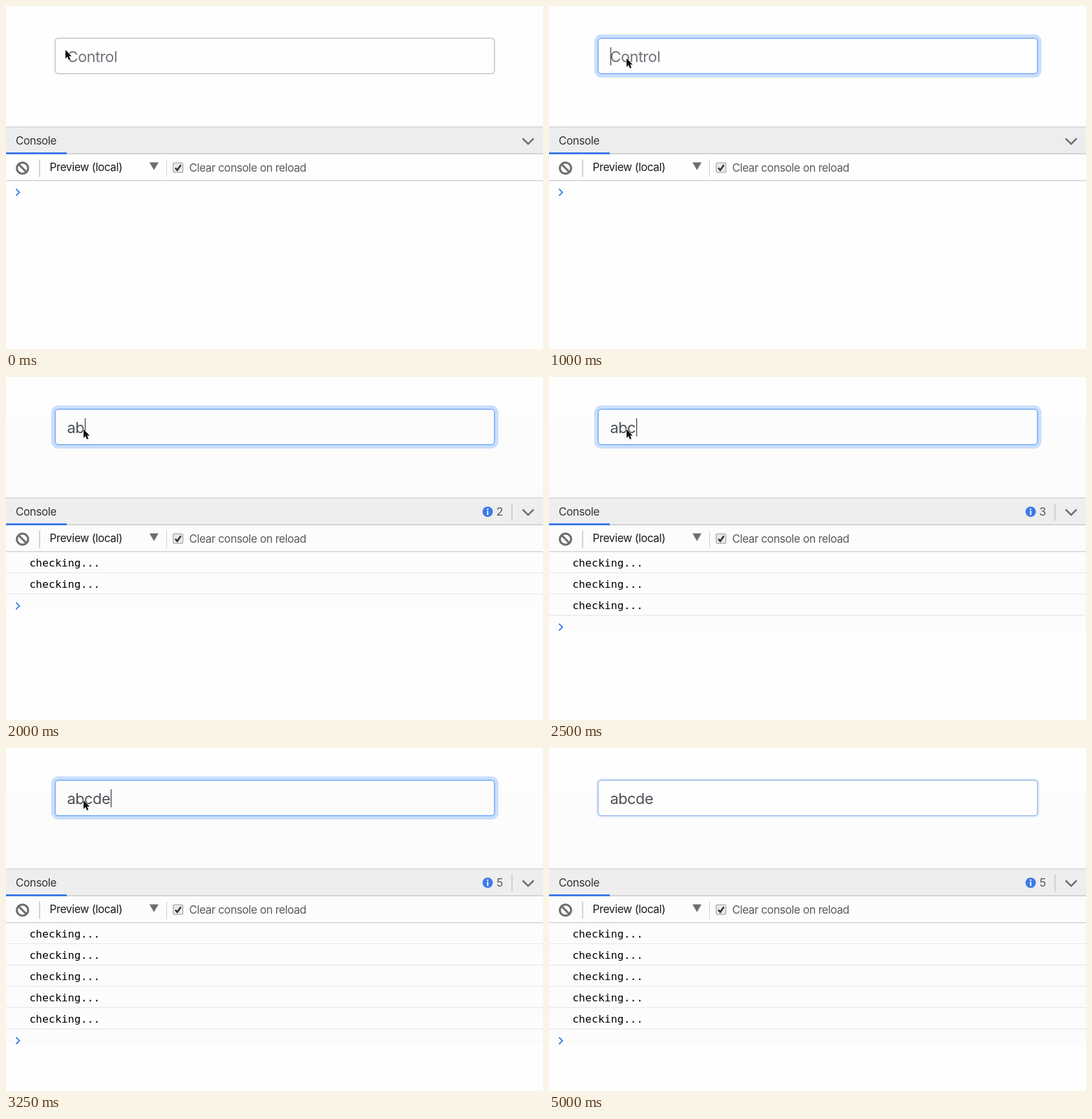
These frames come from a looping animation (831 px wide and 532 px high, 5250 ms). An HTML page:

```html
<!DOCTYPE html>
<html lang="en">
<head>
<meta charset="utf-8">
<title>Console check</title>
<style>
  html, body { margin: 0; width: 100%; height: 100%; overflow: hidden; background: #fefefe; }
  svg { display: block; width: 831px; height: 532px; }
  text { font: 17px Inter, "Open Sans", sans-serif; letter-spacing: -.42px; white-space: pre; }
  #value { font-size: 23.5px; letter-spacing: -.5px; }
  .log text { font: 16.5px "DejaVu Sans Mono", monospace; letter-spacing: 0; }
  .line { fill: none; stroke-linecap: butt; }
</style>
</head>
<body>
<svg viewBox="0 0 831 532">
  <rect id="tint" y="64" width="831" fill="#fcfcfc"/>

  <rect id="ring" fill="none"/>
  <rect id="field" x="76" y="50" width="680" height="55" rx="5" stroke-width="2"/>
  <text id="value" x="94.5" y="87"/>
  <path id="spell" class="line" d="M95 90.5H160" stroke="#e58a8a" stroke-width="2" stroke-dasharray="4 2"/>
  <rect id="caret" y="64" width="1.2" height="28" fill="#333"/>

  <rect id="bar" y="187" width="831" height="42"/>
  <path class="line" d="M0 187.5H831" stroke="#c6c6c6"/>
  <path class="line" d="M0 229.2H831" stroke="#c9c9c9" stroke-width="1.6"/>
  <path class="line" d="M0 228.5H94" stroke="#3b78e7" stroke-width="3"/>
  <text x="15" y="215" fill="#333">Console</text>
  <path class="line" d="M799.5 205.5L808 214L816.5 205.5" stroke="#6e6e6e" stroke-width="2.6"/>
  <g id="badge">
    <path class="line" d="M783 196V223" stroke="#c4c4c4" stroke-width="1.4"/>
    <g id="info">
      <circle r="8" fill="#3f79e8"/>
      <path class="line" d="M0 -5V-2.8M0 -1.5V5" stroke="#fff" stroke-width="2"/>
    </g>
    <text id="count" x="769" y="215" text-anchor="end" fill="#5a5a5a" style="font-size:17.5px"/>
  </g>

  <g class="line" stroke="#6e6e6e" stroke-width="3.2">
    <circle cx="25.5" cy="251.5" r="8.7"/>
    <path d="M19.4 245.4L31.6 257.6"/>
  </g>
  <path class="line" d="M52 238V265" stroke="#c6c6c6" stroke-width="1.6"/>
  <path class="line" d="M248.5 238V265" stroke="#cfcfcf"/>
  <text x="67.5" y="256" fill="#1c1c1c">Preview (local)</text>
  <path d="M222 242.5H236L229 254.5Z" fill="#6e6e6e"/>
  <rect x="258.7" y="243.2" width="15" height="15" rx="2.5" fill="#e8e8e8" stroke="#a9a9a9" stroke-width="1.3"/>
  <path class="line" d="M262 251.2L265 254.6L270.6 246.4" stroke="#333" stroke-width="2.6"/>
  <text x="283.5" y="257" fill="#5a5a5a">Clear console on reload</text>
  <path class="line" d="M0 270.8H831" stroke="#d4d4d4" stroke-width="1.6"/>

  <g id="logs"></g>
  <path id="prompt" class="line" d="M15.5 283.8L20.8 289L15.5 294.2" stroke="#3f7ee8" stroke-width="1.9"/>

  <g id="pointer">
    <path d="M0 0V13.4L3 10.6L5.1 15.6L7.6 14.5L5.5 9.7H9.4Z" transform="translate(.5 1.4)" fill="#000" opacity=".18"/>
    <path d="M0 0V13.4L3 10.6L5.1 15.6L7.6 14.5L5.5 9.7H9.4Z" fill="#111" stroke="#fff" stroke-width="1.2" paint-order="stroke"/>
  </g>
</svg>
<script>
const LOOP = 5250, ROW = 33, MAX_LOGS = 5;
const $ = id => document.getElementById(id);
const caretX = [95, 108, 122, 135, 149, 162];

// stroke colour of the field, ring colour, ring width
const looks = {
  idle: ['#cfd1d4', 'none', 0],
  focusing: ['#b6cbe6', '#eef4fc', 1],
  focused: ['#8ab7f8', '#cbdffc', 5],
  blurring: ['#b0c8ea', '#e6effb', 2],
};

// each step changes only the listed parts of the state
const steps = [
  { at: 0, pointer: [92, 68], look: 'idle', typed: 0, caret: false, spell: false },
  { at: 250, pointer: [106, 94] },
  { at: 500, pointer: [119, 92] },
  { at: 750, pointer: [120, 81], look: 'focusing', caret: true },
  { at: 1000, look: 'focused' },
  { at: 1250, typed: 1 },
  { at: 1750, caret: false },
  { at: 2000, typed: 2, caret: true },
  { at: 2500, typed: 3 },
  { at: 3000, typed: 4 },
  { at: 3250, typed: 5 },
  { at: 3750, pointer: [120.5, 80], caret: false },
  { at: 4000, pointer: [128, 73] },
  { at: 4250, caret: true, spell: true },
  { at: 4500, pointer: null },
  { at: 4750, caret: false, spell: false },
  { at: 5000, look: 'blurring' },
];

function set(id, attrs) {
  for (const name in attrs) $(id).setAttribute(name, attrs[name]);
}
function show(el, visible) {
  el.style.display = visible ? '' : 'none';
}

$('logs').innerHTML = Array.from({ length: MAX_LOGS }, (_, i) =>
  `<g class="log" transform="translate(0 ${i * ROW})">
    <text x="36.2" y="294">checking...</text>
    <path class="line" d="M0 303.7H831" stroke="#e3e3e8"/>
  </g>`).join('');
const logs = [...$('logs').children];

function draw(time) {
  const state = Object.assign({}, ...steps.filter(step => step.at <= time));
  const { pointer, look, typed, caret, spell } = state;
  const [edge, glow, width] = looks[look];

  set('field', { stroke: edge, fill: typed && look === 'focused' ? '#fcfcfc' : '#fefefe' });
  set('ring', {
    x: 75 - width / 2, y: 49 - width / 2, width: 682 + width, height: 57 + width,
    rx: 6 + width / 2, stroke: glow, 'stroke-width': width,
  });
  $('value').textContent = typed ? 'abcde'.slice(0, typed) : 'Control';
  set('value', { fill: typed ? '#495057' : '#6f757b' });
  set('caret', { x: caretX[typed] });
  show($('caret'), caret);
  show($('spell'), spell);

  set('tint', { height: typed ? 231 + typed * ROW : 0 });
  set('bar', { fill: typed ? '#eeeeee' : '#ecedef' });
  show($('badge'), typed);
  $('count').textContent = typed;
  set('info', { transform: `translate(${typed === 1 ? 748 : 745.4} 209)` });
  logs.forEach((log, i) => show(log, i < typed));
  set('prompt', { transform: `translate(0 ${typed * ROW})` });

  show($('pointer'), pointer);
  if (pointer) set('pointer', { transform: `translate(${pointer})` });
}

const start = performance.now();
function tick() {
  draw((performance.now() - start) % LOOP);
  requestAnimationFrame(tick);
}
tick();
</script>
</body>
</html>
```
